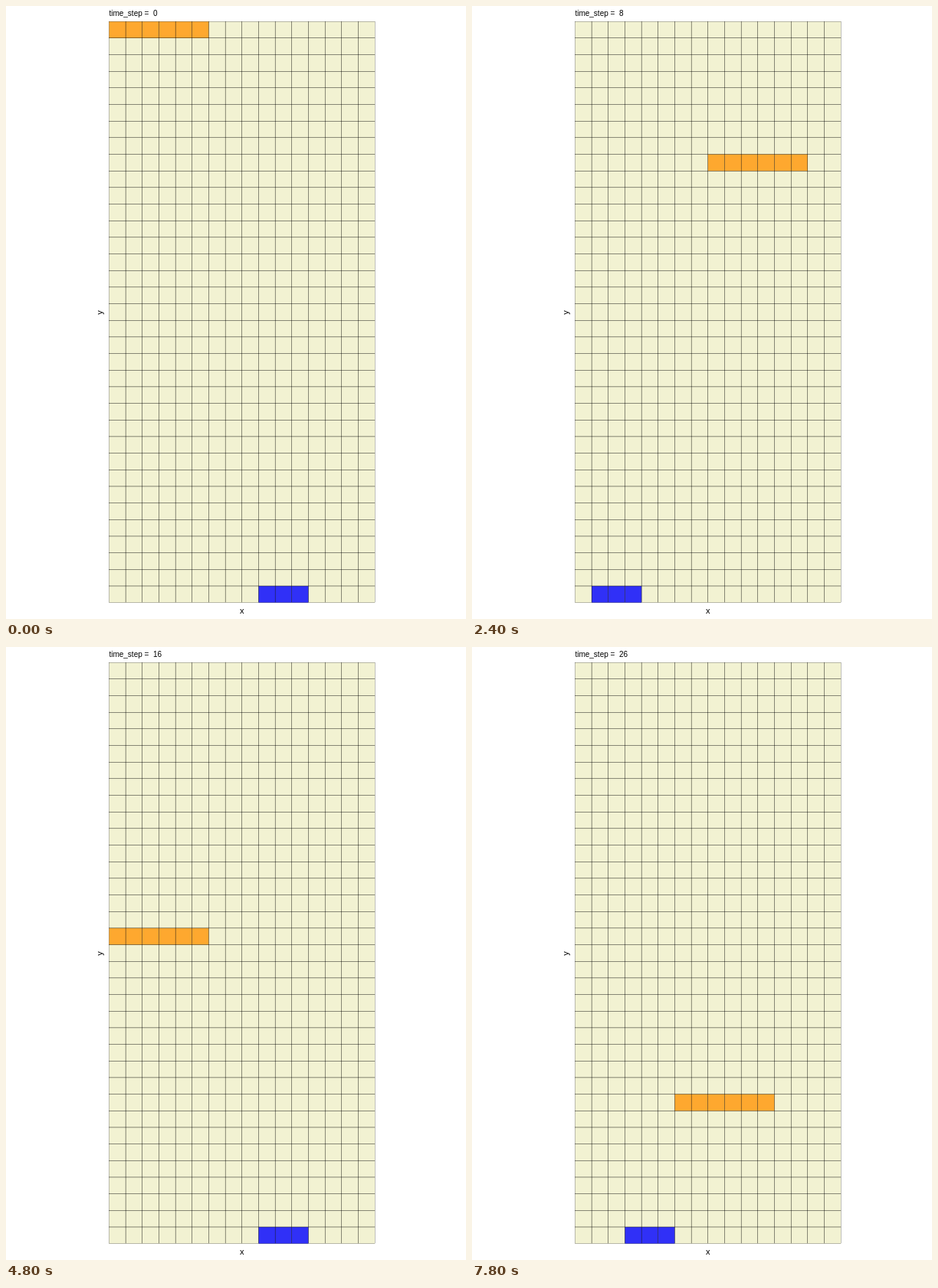
Recreate the animation shown at these times as an HTML page with a canvas. Size 600x800 px, loop 8 s.

```html
<!DOCTYPE html>
<html lang="en">
<head>
<meta charset="utf-8">
<title>Grid walk</title>
<style>
  html, body { margin: 0; width: 100%; height: 100%; overflow: hidden; background: #fff; }
  canvas { display: block; }
</style>
</head>
<body>
<canvas id="stage" width="600" height="800"></canvas>
<script>
const ctx = document.getElementById('stage').getContext('2d');
const COLS = 16, ROWS = 35, CELL = 21.67, LEFT = 134.4, TOP = 20.2;
const LOOP = 8000, STEP = 300;

function bar(col, row, length, color) {
  ctx.fillStyle = color;
  for (let i = 0; i < length; i++) {
    const c = (col + i + 2 * COLS) % COLS;
    ctx.fillRect(LEFT + c * CELL, TOP + row * CELL, CELL, CELL);
  }
}

function label(text, x, y, size, align) {
  ctx.font = size + 'px "Liberation Sans", Arial, sans-serif';
  ctx.textAlign = align;
  ctx.fillText(text, x, y);
}

function draw(step) {
  ctx.fillStyle = '#fff';
  ctx.fillRect(0, 0, 600, 800);
  ctx.fillStyle = '#f2f2d2';
  ctx.fillRect(LEFT, TOP, COLS * CELL, ROWS * CELL);

  // Both bars wrap around the sides
  bar(-step, step, 6, '#fea82f');
  bar(9 + step, ROWS - 1, 3, '#3030f7');

  // Shared cell edges are stroked twice, so the outer frame stays lighter
  ctx.strokeStyle = '#000';
  ctx.lineWidth = 0.25;
  for (let r = 0; r < ROWS; r++)
    for (let c = 0; c < COLS; c++)
      ctx.strokeRect(LEFT + c * CELL, TOP + r * CELL, CELL, CELL);

  ctx.fillStyle = '#000';
  label('time_step =  ' + step, LEFT, 13, 10, 'left');
  label('x', LEFT + COLS * CELL / 2, 793, 11, 'center');
  ctx.save();
  ctx.translate(126, 400);
  ctx.rotate(-Math.PI / 2);
  label('y', 0, 0, 11, 'center');
  ctx.restore();
}

const start = performance.now();
function tick() {
  draw(Math.floor((performance.now() - start) % LOOP / STEP));
  requestAnimationFrame(tick);
}
tick();
</script>
</body>
</html>
```
